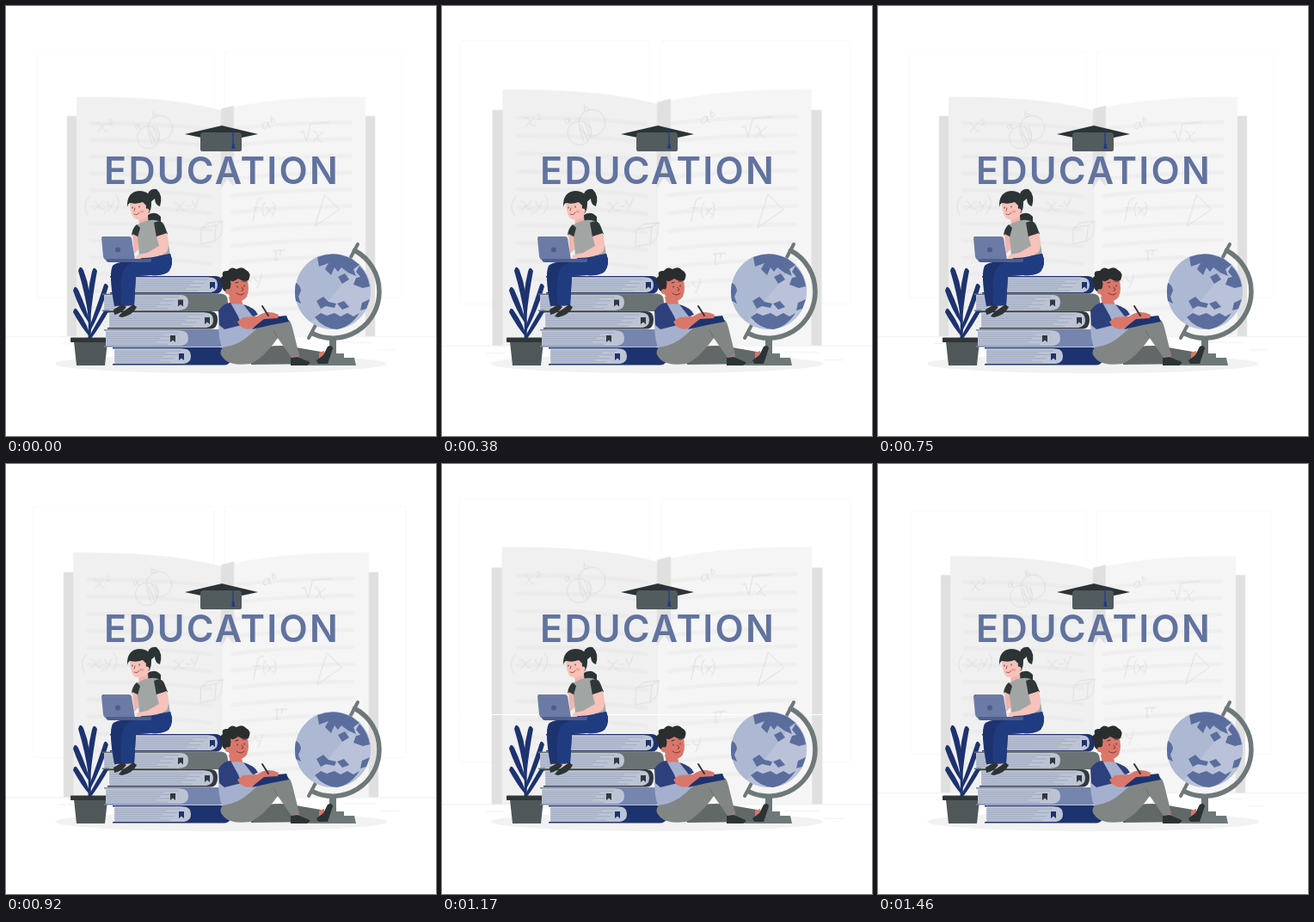
These frames come from a looping animation (500 by 500 pixels, 1.5 s). An HTML page:

```html
<!DOCTYPE html>
<html lang="en">
<head>
<meta charset="utf-8">
<title>Education</title>
<style>
  html, body { margin: 0; width: 100%; height: 100%; overflow: hidden; background: #fff; }
  svg { display: block; width: 100vw; height: 100vh; }
  #book { transform-origin: 250px 229px; }
  .title { font: 600 43.2px Inter, sans-serif; letter-spacing: 2.2px; fill: #61739e; }
  .line { fill: none; stroke-linecap: round; stroke-linejoin: round; }
</style>
</head>
<body>
<svg viewBox="0 0 500 500">
  <g id="book">
    <g fill="none" stroke="#f8f8f8">
      <rect x="19.5" y="39.5" width="222" height="308" rx="3"/>
      <rect x="254.500" y="39.5" width="222" height="308" rx="3"/>
      <path stroke="#f0f0f0" d="M-30 396.5H530M398 404H440M446 413H468M50 405H72"/>
    </g>
    <rect x="57" y="120" width="386" height="276" fill="#e0e0e0"/>
    <path fill="#f0f0f0" d="M69 96Q184 95 250 113V396H69Z"/>
    <path fill="#f5f5f5" d="M431 96Q316 95 250 113V396H431Z"/>
    <g id="rules" class="line" stroke-width="4.5"></g>
    <path fill="#e0e0e0" d="M250 111L266 107V208L258 199L250 211Z"/>
    <g class="line" stroke="#dadada" stroke-width=".8">
      <path d="M95 129q4 0 6 5t6 5M106 129q-6 5-10 11M109 126q3-3 4 0t-4 5h5"/>
      <circle cx="159" cy="147" r="14"/><circle cx="174" cy="135" r="15.5"/>
      <path d="M159 142l5 14M161 137l8 20M165 134l7 18M170 134l3 10"/>
      <path d="M147 131q-4-1-4 3t4 0v-3q0 4 2 5M165 114v7q5 1 5-2t-5-1"/>
      <path d="M309 128q-7-1-7 5t7 0v-5q0 6 3 7M313 121v7q5 0 4-3t-4-1"/>
      <path d="M349 140l4-1 4 13 5-22 23-2M365 139q5 0 6 7t6 7M378 140q-7 5-12 12"/>
      <path d="M85 221q-10 11-2 23M90 227q4 0 6 5t7 5M103 227q-7 5-12 11M106 238l-2 4M108 227q0 6 5 6M116 226q-3 9-8 14M118 219q9 10-1 22"/>
      <path d="M192 229q4 0 6 5t7 4M204 228q-6 5-11 12M207 233h5M214 226q0 6 4 6M222 223q-2 8-6 14"/>
      <path d="M226 260l18-3-2 20-17 3zM226 260l8-6 18-2-8 5M252 252l-2 18-8 7"/>
      <path d="M302 223q-7-1-8 9l-4 19M289 235h10M305 228q-6 9-1 18M306 234q3 0 4 4t5 4M315 234q-5 3-8 9M315 228q6 8-1 18"/>
      <path d="M380 219L398 237L368 258Z"/>
      <path d="M316 289q6-1 14-1M319 289l-1 12q3 0 4-2M325 289l-1 5"/>
      <path d="M282 327h6M292 321q0 7 5 6M301 318q-2 11-6 17"/>
    </g>
  </g>

  <ellipse cx="250" cy="416" rx="193" ry="11" fill="#f2f2f2"/>
  <text class="title" x="251" y="206.500" text-anchor="middle">EDUCATION</text>

  <path fill="#2b3336" d="M208 149L251 139L293 149L251 158Z"/>
  <path fill="#525b5e" d="M226 151Q226 147 230 147H270Q274 147 274 151V167Q274 169 272 169H228Q226 169 226 167Z"/>
  <path class="line" stroke="#1f3b82" stroke-width="1.2" d="M264 144V162"/>
  <path fill="#1f3b82" d="M263 160h2.5l.8 6h-4z"/>

  <!-- plant -->
  <g id="leaves" fill="#1d336f"></g>
  <path class="line" stroke="#1d336f" stroke-width="3" d="M97 388Q98 366 96 346"/>
  <path fill="#4f5759" d="M79 390H118L115 418H82Z"/>
  <rect x="75" y="385.500" width="47" height="5.500" rx="1" fill="#2e3638"/>

  <g id="stack"></g>

  <!-- girl -->
  <path fill="#2b3335" d="M163 244Q173 237 180 245V253H165Z"/>
  <path fill="#efb5ac" d="M154 244H165L166 256L155 258Z"/>
  <path fill="#a1a6a5" d="M152 255Q169 244 181 252Q189 270 191 290L155 294Q155 280 151 266Z"/>
  <path fill="#303739" d="M172 252Q181 248 184 255L188 265L175 269Z"/>
  <path fill="#303739" d="M152 254Q147 258 146 266L153 269L156 258Z"/>
  <path fill="#efb5ac" d="M147 265L153 268L154 283L149 288Z"/>
  <path fill="#f6c2b9" d="M128 347H137L137 352L129 354ZM140 347H149L148 352H139Z"/>
  <path fill="#1d336f" d="M157 290Q176 292 191 288Q196 300 189 309Q183 314 168 313L151 314L149 348L126 349Q119 312 124 302Q130 296 157 297Z"/>
  <path fill="#203c80" d="M158 291Q176 292 191 288Q196 300 189 309Q183 314 168 313L151 314L149 348L134 349Q132 315 138 305Q143 298 158 297Z"/>
  <path fill="#f6c2b9" d="M175 268L187 264Q191 280 187 286Q178 293 159 293L152 294Q150 291 154 289L164 287L178 279Z"/>
  <path fill="#2b3335" d="M164 224Q165 211 175 213Q183 220 179 233Q173 231 173 224L167 229Z"/>
  <path fill="#f6c2b9" d="M144 228Q154 219 166 229Q169 240 163 246Q156 250 149 247Q144 241 144 228Z"/>
  <path fill="#2b3335" d="M141 234Q140 216 155 215Q169 215 169 229Q169 237 166 241Q162 237 163 232L159 228Q151 231 145 229Q142 229 141 234Z"/>
  <circle cx="164" cy="238" r="2.5" fill="#f6c2b9"/>
  <g class="line" stroke="#2b3335" stroke-width="1">
    <path d="M147 234v1M155 233v1"/>
    <path stroke="#a14e4d" d="M150 235l-1 3M149 242q4 2 6-2"/>
  </g>
  <ellipse cx="158" cy="239" rx="2.500" ry="1.500" fill="#eb9f99"/>
  <path fill="#6b7ba5" d="M112 268H143Q145 268 146 270L150 295H116Q114 295 113 291L111 270Z"/>
  <path fill="#4c5f8d" d="M116 294H169V296Q169 298 166 298H120Q116 298 116 294Z"/>
  <circle cx="130" cy="283.500" r="3" fill="#4c5d8c"/>
  <path fill="#2b3335" d="M125 353L135 347L140 350Q135 357 126 359ZM134 357L148 347L152 350Q148 359 135 362L131 361Z"/>

  <!-- globe -->
  <path class="line" stroke="#6e7879" stroke-width="5.500" stroke-linecap="butt" d="M405.400 284.300A54 54 0 0 1 434 332A54 54 0 0 1 356.300 380.700"/>
  <path class="line" stroke="#6e7879" stroke-width="4" stroke-linecap="butt" d="M409 277L401 292M360 371L352 386"/>
  <path fill="#6e7879" d="M376 385H384V404H393V409H405L407 418H352L356 409H367V404H376Z"/>
  <circle cx="380" cy="332" r="44" fill="#adb8d2"/>
  <path fill="#b9c2d9" d="M410 299Q428 318 423 340Q413 375 380 376Q365 375 355 368Z"/>
  <g fill="#5a6d9d">
    <path d="M362 292Q382 284 402 294L411 301L404 306L407 314L398 310L390 304L386 309L382 304L378 313L371 306L375 299L364 303Z"/>
    <path d="M337 322Q342 324 343 331L340 338L343 346L337 343Q335 332 337 322Z"/>
    <path d="M411 302Q421 312 423 326L415 328L404 324L407 316L412 315L407 309Z"/>
    <path d="M386 315L394 311L399 318L391 323Z"/>
    <path d="M361 343L369 338L375 344L384 346L382 351L372 349L366 352Z"/>
    <path d="M385 346L393 343L399 350L391 353Z"/>
    <path d="M359 362L366 357L373 360L382 357L389 361L397 357L404 361L411 357Q401 373 385 376Q369 375 359 362Z"/>
    <path d="M414 345l9-4-4 11-7 2z"/>
  </g>

  <!-- boy -->
  <path fill="#626867" d="M284 401Q315 391 343 398L366 402L364 416L285 417Z"/>
  <path fill="#d9776a" d="M331 402L340 403L341 411L334 412ZM364 403L370 401L371 409L364 410Z"/>
  <path fill="#2b3335" d="M331 409L339 408L353 414Q354 418 349 418H331ZM361 412L369 406L374 396Q379 393 380 398L374 416H363Z"/>
  <path fill="#d9776a" d="M259 338H273L276 350L262 352Z"/>
  <path fill="#a5b0cf" d="M248 353Q258 344 276 347Q290 353 293 369L292 398L253 401Q245 387 248 353Z"/>
  <path fill="#2d407c" d="M247 354Q254 345 261 345L270 361L274 371L254 376L248 371Z"/>
  <path fill="#2d407c" d="M276 347Q290 351 293 359L287 361Z"/>
  <path fill="#818584" d="M252 397Q270 395 284 382Q304 362 321 362Q331 363 333 374L341 406L332 409L316 386Q299 410 284 416Q263 419 254 411Q246 403 252 397Z"/>
  <path class="line" stroke="#656a69" stroke-width=".8" d="M316 386L311 377"/>
  <path fill="#1d336f" d="M286 376L298 363L326 360L329 367L308 371Z"/>
  <path fill="#d9776a" d="M269 367L276 362L292 361Q304 352 317 359L316 363L300 364L286 375Q274 378 269 367Z"/>
  <path class="line" stroke="#303739" stroke-width="2" d="M298 349L305 360"/>
  <path fill="#d9776a" d="M257 319Q263 311 280 316Q284 329 280 338Q275 345 266 343Q255 337 257 319Z"/>
  <path fill="#292d2e" d="M256 333Q250 329 251 323Q246 318 252 314Q250 307 258 308Q262 302 268 306Q275 302 279 307Q286 310 282 319Q276 321 270 317Q263 322 261 319Q263 328 257 333Z"/>
  <circle cx="258" cy="332" r="3" fill="#d9776a"/>
  <g class="line" stroke="#2b3335" stroke-width="1">
    <path d="M269 326v1M277 325v1M267 322l3-1M275 320l4 0"/>
    <path stroke="#88342f" d="M274 327l2 3-2 1M268 334q5 4 9 0"/>
  </g>
</svg>
<script>
const $ = id => document.getElementById(id);

// ruled lines on both pages
let rules = '';
for (let y = 129; y < 380; y += 21)
  rules += `<path stroke="#ebebeb" d="M87 ${y}Q180 ${y} 237 ${y + 8}"/>
    <path stroke="#efefef" d="M412 ${y - 1}Q322 ${y} 264 ${y + 7}"/>`;
$('rules').innerHTML = rules;

// leaf from the stem to a tip: [base y, bend x, bend y, tip x, tip y]
const leaves = [
  [362, 96, 332, 87, 304], [362, 97, 334, 103, 305],
  [368, 90, 352, 81, 327], [376, 108, 352, 116, 323],
  [383, 92, 372, 81, 352], [386, 106, 372, 119, 347]
];
$('leaves').innerHTML = leaves.map(([b, x, y, tx, ty]) =>
  `<path d="M96 ${b}Q${x - 4} ${y + 2} ${tx - 3} ${ty + 4}Q${tx - 1} ${ty - 4} ${tx + 3} ${ty + 3}Q${x + 4} ${y} 98 ${b + 2}Z"/>`).join('');

// [left, right, page end, top, cover, mark x]
const books = [
  [121, 252, 246, 314, '#1d336f', 237],
  [112, 258, 212, 334.5, '#6b7273', 200],
  [118, 246, 241, 355, '#32383c', 231],
  [114, 256, 212, 376, '#7585ae', 191],
  [124, 262, 215, 397, '#1d336f', 201]
];
$('stack').innerHTML = books.map(([l, r, e, y, cover, m]) => {
  let lines = '';
  for (let i = 0; i < 7; i++)
    lines += `M${l + 3} ${y + 4 + i * 2.2}H${e - 12 - (i * 17) % 30}`;
  return `<path fill="${cover}" d="M${l} ${y}H${r - 8}Q${r} ${y} ${r} ${y + 10}T${r - 8} ${y + 20.5}H${l}V${y + 19}H${e - 10}V${y + 1.5}H${l}Z"/>
    <path fill="#bcc4d4" d="M${l + 2} ${y + 1.5}H${e - 8}Q${e} ${y + 2} ${e} ${y + 10}T${e - 8} ${y + 19}H${l + 2}Z"/>
    <path class="line" stroke="#97a3be" stroke-width=".8" d="${lines}"/>
    <path fill="${cover === '#1d336f' ? cover : '#32383c'}" d="M${m} ${y + 7}h6v8l-3-2.500l-3 2.500z"/>`;
}).join('');

// the book pulses: [ms, share of the full swell]
const loop = 1500;
const beats = [[0, .12], [285, 1], [815, 0], [1125, 1], [1461, 0], [loop, .12]];
$('book').animate(
  beats.map(([t, v]) => ({ offset: t / loop, transform: `scale(${.917 + .092 * v})` })),
  { duration: loop, iterations: Infinity }
);
</script>
</body>
</html>
```
